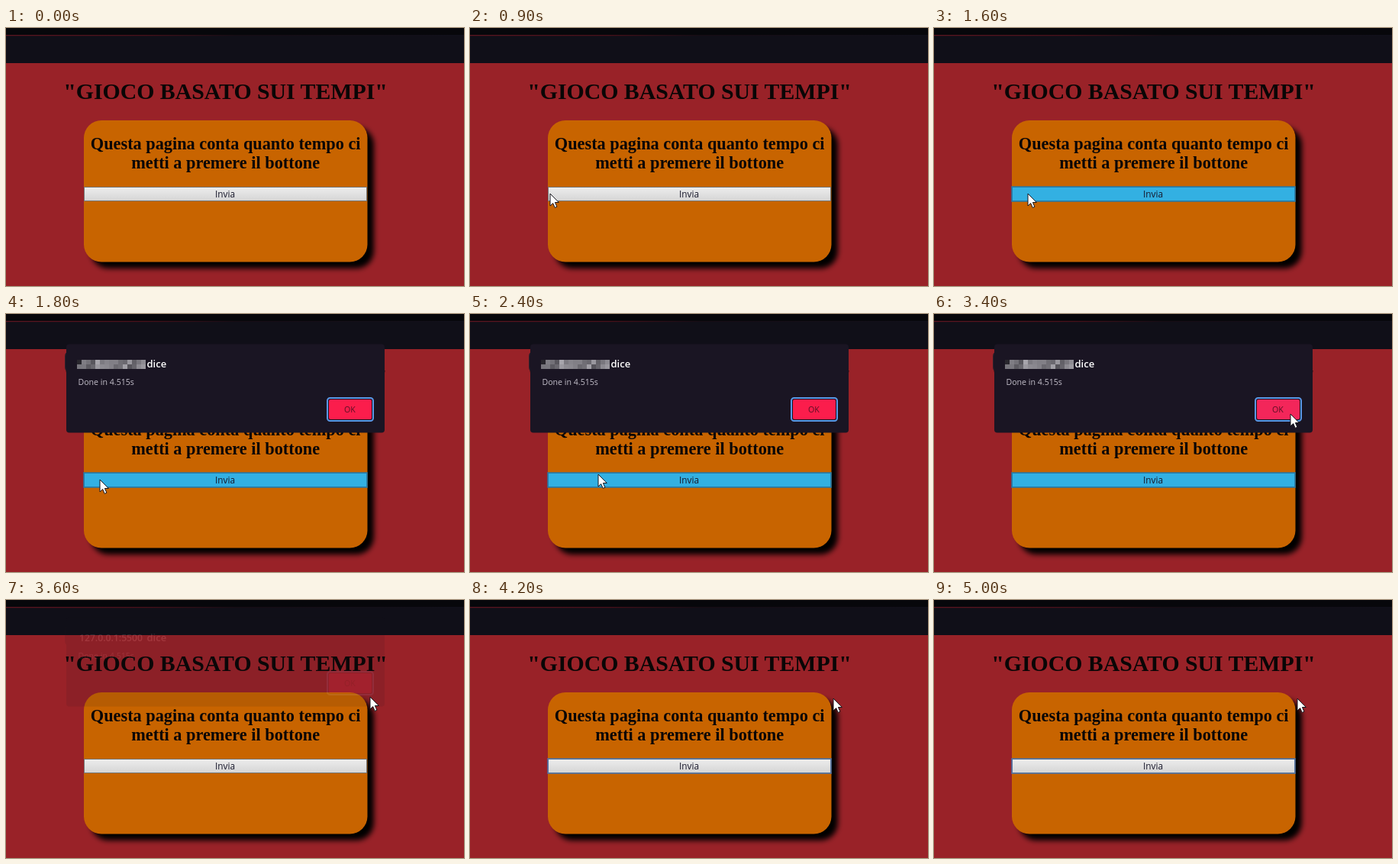
Animation of 600 by 338 pixels, one loop 5100 ms. Source, as an HTML page:

```html
<!DOCTYPE html>
<html lang="it">
<head>
<meta charset="utf-8">
<title>Gioco basato sui tempi</title>
<style>
  html, body { margin: 0; width: 100%; height: 100%; overflow: hidden; background: #992228; }
  svg { display: block; width: 600px; height: 338px; }
  .serif { font-family: "Liberation Serif", "Times New Roman", serif; font-weight: 700; fill: #090606; text-anchor: middle; }
  .sans { font-family: "Open Sans", "Noto Sans", sans-serif; }
  .mid { text-anchor: middle; }

  .anim { animation: 5100ms step-end infinite; }
  #hover { animation-name: hover; }
  #focus { animation-name: focus; }
  #dialog { animation-name: dialog; }
  #mosaic { animation-name: mosaic; }
  #host { animation-name: host; }
  #okFill { animation-name: ok; }
  #cursor { animation-name: cursor; }

  @keyframes hover {
    0%, 70.5% { opacity: 0; }
    23.5% { opacity: 1; }
  }
  @keyframes focus {
    0% { opacity: 0; }
    31.3% { opacity: 1; stroke: #2679a8; }
    70.5% { opacity: 0; }
    72.5%, 100% { opacity: 1; stroke: #4a74ae; }
  }
  @keyframes dialog {
    0% { opacity: 0; transform: translateY(-8px); }
    33.3% { opacity: .6; transform: translateY(-6px); }
    35.2% { opacity: 1; transform: none; }
    68.6% { opacity: .6; transform: translateY(-8px); }
    70.5% { opacity: .1; transform: translateY(-16px); }
    72.5%, 100% { opacity: 0; transform: translateY(-16px); }
  }
  @keyframes mosaic {
    0% { opacity: 1; }
    70.5%, 100% { opacity: 0; }
  }
  @keyframes host {
    0% { opacity: 0; }
    70.5%, 100% { opacity: 1; }
  }
  @keyframes ok {
    0% { fill: #fb1d4c; }
    52.9%, 100% { fill: #f3265a; }
  }
  @keyframes cursor {
    0% { opacity: 0; transform: translate(5px, 226px); }
    11.7% { opacity: 1; transform: translate(12px, 225px); }
    13.7% { opacity: 1; transform: translate(60px, 221px); }
    15.6% { opacity: 1; transform: translate(94px, 218px); }
    17.6% { opacity: 1; transform: translate(105px, 217px); }
    23.5% { opacity: 1; transform: translate(123px, 217px); }
    47% { opacity: 1; transform: translate(168px, 210px); }
    49% { opacity: 1; transform: translate(285px, 184px); }
    50.9% { opacity: 1; transform: translate(405px, 150px); }
    52.9% { opacity: 1; transform: translate(460px, 133px); }
    54.9% { opacity: 1; transform: translate(467px, 131px); }
    68.6% { opacity: 1; transform: translate(473px, 128px); }
    70.5% { opacity: 1; transform: translate(477px, 127px); }
    78.4%, 100% { opacity: 1; transform: translate(476px, 129px); }
  }
</style>
</head>
<body>
<svg viewBox="0 0 600 338">
  <defs>
    <linearGradient id="line">
      <stop stop-color="#5c1520"/>
      <stop offset=".3" stop-color="#481019"/>
      <stop offset=".5" stop-color="#160c14"/>
      <stop offset="1" stop-color="#11101a"/>
    </linearGradient>
    <linearGradient id="grey" x2="0" y2="1">
      <stop stop-color="#ededed"/>
      <stop offset="1" stop-color="#d5d5d5"/>
    </linearGradient>
    <filter id="blur" x="-10%" y="-10%" width="120%" height="120%">
      <feGaussianBlur stdDeviation="3.6"/>
    </filter>
  </defs>

  <rect width="600" height="338" fill="#992228"/>
  <rect width="600" height="46" fill="#100f18"/>
  <rect width="600" height="9" fill="#07070b"/>
  <rect y="9" width="600" height="1.3" fill="url(#line)"/>

  <text class="serif" x="287.5" y="93" font-size="29.8">"GIOCO BASATO SUI TEMPI"</text>

  <rect x="111" y="130" width="371" height="185" rx="23" fill="#000" filter="url(#blur)"/>
  <rect x="102" y="121" width="371.5" height="185.5" rx="23" fill="#c86400"/>
  <g class="serif" font-size="22.3">
    <text x="287.7" y="159">Questa pagina conta quanto tempo ci</text>
    <text x="287.7" y="184">metti a premere il bottone</text>
  </g>

  <rect x="102.5" y="208.5" width="370" height="18" fill="url(#grey)" stroke="#777"/>
  <rect id="hover" class="anim" x="102.5" y="208.5" width="370" height="18" fill="#33b0e2" stroke="#2d86ac"/>
  <rect id="focus" class="anim" x="102" y="208" width="371" height="19" fill="none" stroke-width="1.5"/>
  <text class="sans mid" x="287" y="222" font-size="11.8" fill="#17172a">Invia</text>

  <g id="dialog" class="anim">
    <path d="M80 50Q77.5 51 77.5 56V69Q77.5 74 80 75" fill="#1a1523" stroke="#30202a"/>
    <rect x="79" y="39.5" width="417" height="116" rx="4" fill="#1a1523"/>
    <g id="mosaic" class="anim"></g>
    <text id="host" class="sans anim" x="96" y="70" font-size="12.2" font-weight="600" fill="#fff">127.0.0.1:5500</text>
    <text class="sans" x="184.5" y="70" font-size="13" font-weight="600" fill="#fff">dice</text>
    <text class="sans" x="94.5" y="93" font-size="10.6" fill="#c3bfca">Done in 4.515s</text>
    <rect x="421" y="110" width="60" height="30" rx="3.5" fill="#1a1523" stroke="#5a97e6" stroke-width="2"/>
    <rect id="okFill" class="anim" x="423" y="112" width="56" height="26" rx="2"/>
    <text class="sans mid" x="450.3" y="129" font-size="10.6" fill="#5c0f24">OK</text>
  </g>

  <path id="cursor" class="anim" d="M0 0V16L3.7 12.6 6.2 18.4 8.9 17.2 6.4 11.5H11.3Z"
        fill="#fff" stroke="#15151c" stroke-width="1"/>
</svg>
<script>
  // Pixelated host name: two rows of seeded grey blocks
  const mosaic = document.getElementById("mosaic");
  const size = 6;
  let seed = 11;
  const random = () => (seed = seed * 16807 % 2147483647) / 2147483647;
  for (let i = 0; i < 30; i++) {
    const col = i % 15, row = Math.floor(i / 15);
    const v = Math.round((col ? 85 : 40) + random() * 95);
    const block = document.createElementNS("http://www.w3.org/2000/svg", "rect");
    const box = { x: 93 + col * size, y: 60 + row * size, width: size, height: size, fill: `rgb(${v},${v - 2},${v + 5})` };
    for (const key in box) block.setAttribute(key, box[key]);
    mosaic.append(block);
  }
</script>
</body>
</html>
```
